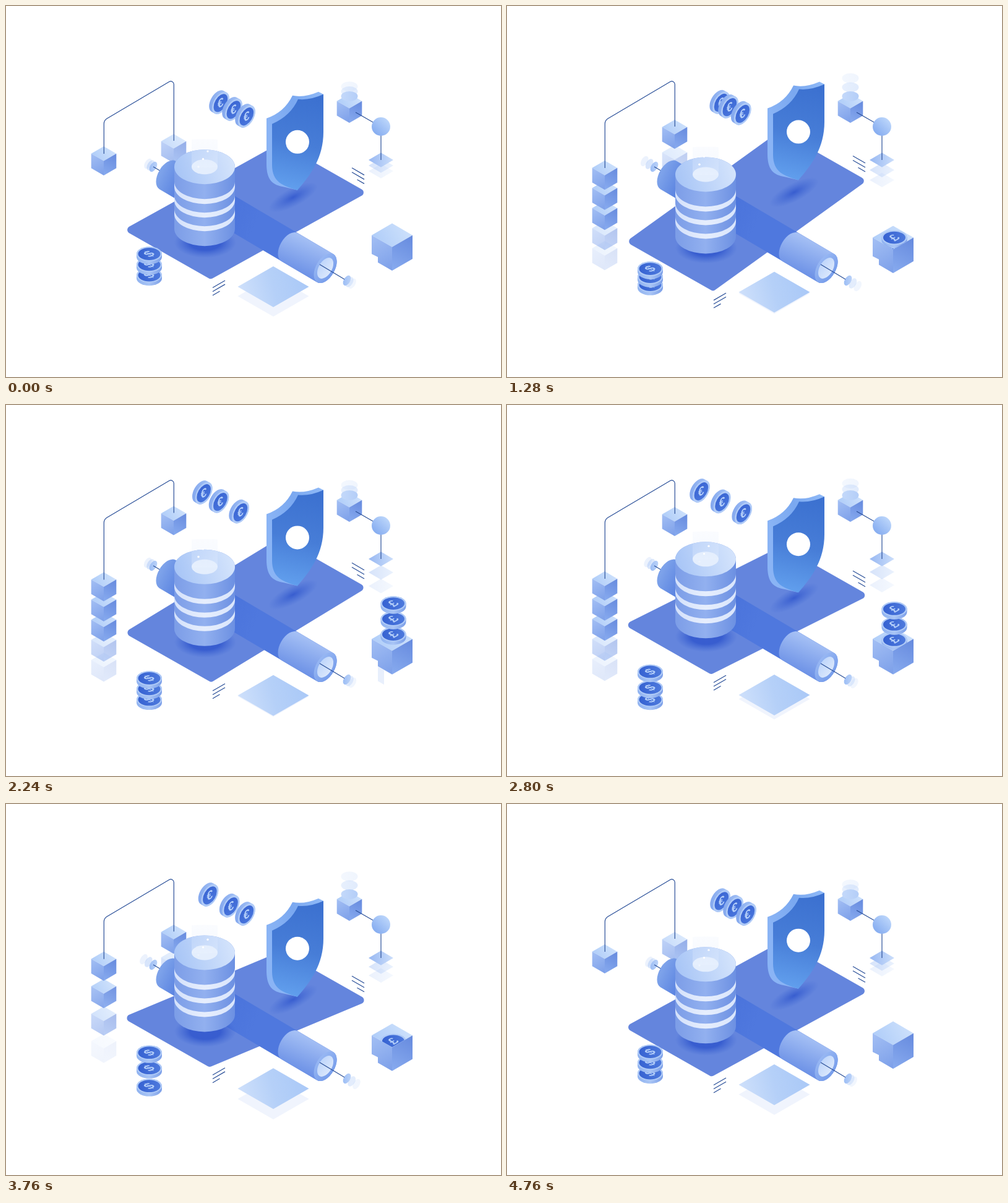
An HTML page with a canvas that plays this animation: 800 px wide and 600 px high, repeating every 4800 ms.

```html
<!DOCTYPE html>
<html lang="en">
<head>
<meta charset="utf-8">
<title>Isometric data protection</title>
<style>
html, body { margin: 0; width: 100%; height: 100%; overflow: hidden; background: #fff; }
canvas { display: block; }
</style>
</head>
<body>
<canvas id="stage" width="800" height="600"></canvas>
<script>
const ctx = document.getElementById('stage').getContext('2d');
const LOOP = 4800, TAU = Math.PI * 2, Q = Math.PI / 2, ISO = Math.PI / 6, RISE = .58;
const INK = '#2b5099';

const clamp = v => Math.max(0, Math.min(1, v));
const wave = (t, period, peak = 0) => Math.cos(TAU * (t - peak) / period);
const bump = (t, mid, width) => clamp(1 - Math.abs(t - mid) / width);
const ramp = (t, from, span) => {
  const u = clamp((t - from) / span);
  return u * u * (3 - 2 * u);
};
// Eases from 0 to 1 at time up and back to 0 at time down.
const swing = (t, up, down, upSpan, downSpan) => ramp(t, up, upSpan) - ramp(t, down, downSpan);

function grad(x0, y0, x1, y1, ...colors) {
  const g = ctx.createLinearGradient(x0, y0, x1, y1);
  colors.forEach((c, i) => g.addColorStop(i / (colors.length - 1), c));
  return g;
}

function fill(style, draw) {
  ctx.beginPath();
  draw();
  ctx.fillStyle = style;
  ctx.fill();
}

function poly(style, ...p) {
  fill(style, () => { for (let i = 0; i < p.length; i += 2) ctx.lineTo(p[i], p[i + 1]); });
}

function stroke(draw) {
  ctx.beginPath();
  draw();
  ctx.strokeStyle = INK;
  ctx.lineWidth = 1.2;
  ctx.stroke();
}

const line = (x0, y0, x1, y1) => stroke(() => { ctx.moveTo(x0, y0); ctx.lineTo(x1, y1); });

function faded(alpha, draw) {
  if (alpha <= 0) return;
  ctx.save();
  ctx.globalAlpha *= alpha;
  draw();
  ctx.restore();
}

// Draws a part with two paler copies behind it.
function echo(draw) {
  for (let k = 2; k >= 0; k--) faded(k ? .4 / k : 1, () => draw(k));
}

const oval = (style, x, y, rx, ry) => fill(style, () => ctx.ellipse(x, y, rx, ry, 0, 0, TAU));
const rhomb = (style, x, y, w, h) => poly(style, x - w, y, x, y - h, x + w, y, x, y + h);

// Round bar along the iso axis running down to the right; r is the long half axis.
function tube(style, x0, y0, x1, y1, r) {
  fill(style, () => {
    ctx.ellipse(x1, y1, r * .577, r, ISO, -Q, Q);
    ctx.ellipse(x0, y0, r * .577, r, ISO, Q, 3 * Q);
  });
}
const disc = (style, x, y, r) => tube(style, x, y, x, y, r);

function column(style, x, y0, y1, rx, ry) {
  fill(style, () => {
    ctx.ellipse(x, y1, rx, ry, 0, 0, Math.PI);
    ctx.ellipse(x, y0, rx, ry, 0, Math.PI, TAU);
  });
}

function softShadow(x, y, rx, ry, angle, core) {
  ctx.save();
  ctx.translate(x, y);
  ctx.rotate(angle);
  ctx.scale(rx, ry);
  const g = ctx.createRadialGradient(0, 0, core, 0, 0, 1);
  g.addColorStop(0, 'rgba(48,86,205,.85)');
  g.addColorStop(1, 'rgba(60,100,210,0)');
  fill(g, () => ctx.arc(0, 0, 1, 0, TAU));
  ctx.restore();
}

function glyph(text, x, y, ...matrix) {
  ctx.save();
  ctx.transform(...matrix, x, y);
  ctx.font = 'bold 20px "Liberation Sans", sans-serif';
  ctx.textAlign = 'center';
  ctx.textBaseline = 'middle';
  ctx.fillStyle = '#b4cff9';
  ctx.fillText(text, 0, 1);
  ctx.restore();
}

function flatCoin(text, x, y) {
  column(grad(x - 20, 0, x + 20, 0, '#8fb2f0', '#a9c5f5', '#7c9fe8'), x, y, y + 5, 20.5, 11.7);
  oval('#b0cbf7', x, y, 20.5, 11.7);
  oval(grad(x - 16, 0, x + 16, 0, '#3763d2', '#4c78dc'), x, y, 18, 9.9);
  glyph(text, x, y, .866, -.5, .866, .5);
}

function standingCoin(x, y) {
  tube(grad(x - 16, y, x + 16, y, '#84a8ee', '#a9c6f7'), x - 2.4, y - 1.4, x + 2.4, y + 1.4, 19.6);
  disc('#b0cbf7', x + 2.4, y + 1.4, 19.6);
  disc(grad(x - 10, y - 12, x + 12, y + 12, '#3560d0', '#4b78de'), x + 2.4, y + 1.4, 16);
  glyph('€', x + 2.4, y + 1.4, .866, -.5, 0, 1);
}

// Cube from its top vertex; notch cuts a step out of the lower left corner.
function cube(x, top, w, notch = 0) {
  const h = w * RISE, mid = top + h, low = top + 2 * h, end = low + w * 1.16;
  poly(grad(x - w, low, x + w, top, '#abcaf8', '#d2e4fc'), x - w, mid, x, top, x + w, mid, x, low);
  poly(grad(x - w, mid, x, end, '#a3bff4', '#7c9fe9'),
    x - w, mid, x, low, x, end, x - w + notch, end - h + notch * RISE,
    x - w + notch, end - h - notch * .3, x - w, end - h - notch * .8);
  poly(grad(x + w, mid, x, end, '#668ade', '#88abef'), x + w, mid, x, low, x, end, x + w, end - h);
}

function hoistedCubes(t) {
  const pull = 43.5 * swing(t, 500, 2614, 1500, 1743);
  const chain = swing(t, 400, 3400, 720, 750);
  const left = 227 + pull, right = 207 - pull, size = 20.3;
  for (let k = 4; k; k--) {
    faded(Math.min(1, 2 ** (2 - k)) * clamp(chain * 4.5 - 1.1 - .35 * k),
      () => cube(158, left + k * (32.5 + (1 - chain) * 25), size));
  }
  cube(158, left, size);
  faded(.42 * clamp((40 - pull) / 10), () => cube(271, right + 41, size));
  faded(.7 + .3 * clamp(pull / 12), () => cube(271, right, size));
  stroke(() => {
    ctx.moveTo(158.3, left + 12);
    ctx.arcTo(158.3, 185, 176, 174.5, 10);
    ctx.arcTo(271.3, 118, 271.3, 140, 5);
    ctx.lineTo(271.3, right + 11);
  });
}

function platform(tilt) {
  const near = [[-197 + tilt * .12, 31.5 + tilt], [-56 + tilt * .12, 111.7 + tilt]];
  const corners = [1, -1].flatMap(s => near.map(([x, y]) => [387 + s * x, 331.8 + s * y]));
  fill('#6485dd', () => {
    ctx.moveTo((corners[0][0] + corners[3][0]) / 2, (corners[0][1] + corners[3][1]) / 2);
    corners.forEach((c, i) => ctx.arcTo(...c, ...corners[(i + 1) % 4], 6));
  });
}

function ticks(tilt) {
  for (let i = 0; i < 3; i++) {
    const w = i < 2 ? 20 : 11.5;
    const left = 457 + tilt * 1.05 + i * 6.2, right = 272 - tilt + i * 7;
    line(334, left, 334 + w, left - w * RISE);
    line(579, right, 579 - w, right - w * RISE);
  }
}

function pipe(gap) {
  const trail = (x, y, dir) => echo(k => {
    const d = dir * k * gap * .62;
    disc(grad(x - 6, y, x + 6, y, '#9dbef5', '#b9d1f8'), x + d * .866, y + d * .5, 9);
  });
  trail(238, 260, -1);
  line(238, 260, 250, 267);
  tube(grad(243, 285, 400, 360, '#7da2ea', '#4671db', '#4a73db', '#4f78de'), 261, 273.5, 516, 424, 26.2);
  tube(grad(495, 378, 472, 432, '#a6c1f5', '#6c91e6'), 458, 390, 516, 424, 26.2);
  disc(grad(500, 410, 534, 440, '#9cbbf4', '#6f97e9'), 516, 424, 26.2);
  disc(grad(503, 415, 530, 435, '#b9d2fa', '#e3edfd'), 516, 424, 18.5);
  trail(551, 444, 1);
  line(507, 418, 547, 442);
}

function database(t) {
  const x = 321, rx = 49, ry = 28;
  const y = 257.7 + 16.5 * wave(t, LOOP, 1160) - 1.6 * wave(t, LOOP / 2, 1160);
  softShadow(x + 1, 383 + .73 * (y - 261), 50, 25, 0, .5);
  column(grad(272, 0, 370, 0, '#7c9de7', '#92b0ef', '#6c90e2'), x, y, y + 100, rx, ry);
  for (let d = 24; d < 70; d += 22) {
    fill(grad(272, 0, 370, 0, '#d4e1fb', '#e6eefd', '#d9e5fc'), () => {
      ctx.ellipse(x, y + d + 8, rx, ry, 0, 0, Math.PI);
      ctx.ellipse(x, y + d, rx, ry, 0, Math.PI, 0, true);
    });
  }
  oval(grad(272, y + 15, 370, y - 15, '#a6c4f6', '#d6e5fc'), x, y, rx, ry);
  oval('#e4eefd', x, y, 21, 12);
  column(grad(0, y - 44, 0, y, 'rgba(215,228,252,.12)', 'rgba(235,243,255,.32)'), x, y - 44, y, 21, 1);
  for (let i = 0; i < 3; i++) {
    const u = (t / 960 + .17 + .26 * i) % 1;
    faded(Math.sin(u * Math.PI), () => oval('#fff', 311 + 7.5 * i, y + 8 - 48 * u, 1.7, 1.7));
  }
}

function shield(tilt) {
  const dy = -.84 * tilt - .3;
  softShadow(464, 309 + dy * .5, 44, 15, -.48, 0);
  ctx.save();
  ctx.translate(0, dy);
  fill(grad(421, 180, 513, 150, '#8ab4f5', '#7aa8f0', '#8fb9f7'), () => {
    ctx.moveTo(421, 181);
    ctx.quadraticCurveTo(450, 171, 463, 144);
    ctx.quadraticCurveTo(482, 148, 505, 138);
    ctx.lineTo(513, 142);
    ctx.lineTo(472, 240);
    ctx.lineTo(471, 297);
    ctx.lineTo(450, 292);
    ctx.bezierCurveTo(430, 289, 421, 280, 421, 254);
  });
  fill(grad(485, 145, 448, 295, '#3c71d0', '#477dd7', '#62a0ee'), () => {
    ctx.moveTo(430, 190);
    ctx.quadraticCurveTo(460, 177, 472, 150);
    ctx.quadraticCurveTo(491, 152, 513, 142);
    ctx.lineTo(513, 203);
    ctx.bezierCurveTo(513, 244, 493, 272, 471, 297);
    ctx.bezierCurveTo(447, 290, 430, 284, 430, 256);
  });
  oval('#fff', 471, 219, 19, 19);
  ctx.restore();
}

function serverChain(t, gap) {
  const drop = 15.5 - 6.5 * wave(t, LOOP);
  cube(555, 142, 20.3);
  echo(k => oval(grad(541, 0, 568, 0, '#c4d9fa', '#b4cef8'), 555, 146 - k * gap, 13.5, 8));
  echo(k => rhomb(grad(586, 0, 626, 0, '#98b8f2', '#cbdefb'), 606, 249 + k * drop, 20, 11.7));
  line(565, 172, 594, 188.5);
  line(606, 209, 606, 249);
  oval(grad(595, 207, 617, 184, '#84abf0', '#bcd6fb'), 606, 195, 15, 15);
}

function bigCube(t) {
  const x = 624, y = 355.5 - 4 * wave(t, LOOP, 100), w = 33;
  // Pale chips slip off the lower edges, longer and fainter as the loop goes on.
  for (const [left, mid] of [[591, 760], [635, 760], [601, 2240], [645, 4200]]) {
    const slope = left < x ? RISE : -RISE;
    const top = y + 77 - Math.abs(x - left) * RISE, h = 10 + t * .006;
    faded((.45 - t * 8e-5) * bump(t, mid, 400), () => poly('#a9c3f5',
      left, top, left + 10, top + 10 * slope, left + 10, top + h + 10 * slope, left, top + h));
  }
  cube(x, y, w, 10);

  const rise = 420 - 103 * swing(t, 229, 2236, 2285, 2550);
  const space = 15 + 10 * swing(t, 1600, 3600, 640, 800);
  ctx.save();
  ctx.beginPath();
  for (const p of [[x - w, y + 19], [x, y + 38], [x + w, y + 19], [x + w, 250], [x - w, 250]]) ctx.lineTo(...p);
  ctx.clip();
  for (let k = 2; k >= 0; k--) flatCoin('£', 626, rise + k * space);
  ctx.restore();
}

function dollarStack(t) {
  for (let k = 2; k >= 0; k--) {
    flatCoin('$', 231.5, 401 + 17.25 * k + 41 * swing(t, 315 + 120 * k, 2240 + 340 * k, 1730, 1690));
  }
}

function euroRow(t) {
  for (let k = 0; k < 3; k++) {
    const shift = (33 - 11.5 * k) * swing(t, 1140 - 480 * k, 2950 - 390 * k, 1500, 1690);
    const x = 344.5 + 21 * k - shift;
    standingCoin(x, 155.5 + (x - 344.5) * .52);
  }
}

function plates(t) {
  const y = 462 - 8 * wave(t, LOOP), gap = 9 + 9 * wave(t, LOOP, 4200);
  rhomb('#f0f4fd', 432, y + gap, 57.5, 33);
  rhomb(grad(375, y + 15, 489, y - 15, '#d0e1fb', '#b5d0f8', '#a9c8f7'), 432, y, 57.5, 33);
}

function render(t) {
  const gap = 11.3 - 3.4 * wave(t, LOOP / 2);
  const tilt = 18 * wave(t, LOOP, 1260);
  ctx.fillStyle = '#fff';
  ctx.fillRect(0, 0, 800, 600);
  hoistedCubes(t);
  platform(tilt);
  plates(t);
  pipe(gap);
  ticks(tilt);
  database(t);
  shield(tilt);
  serverChain(t, gap);
  bigCube(t);
  dollarStack(t);
  euroRow(t);
}

const start = performance.now();
function loop() {
  render((performance.now() - start) % LOOP);
  requestAnimationFrame(loop);
}
loop();
</script>
</body>
</html>
```
